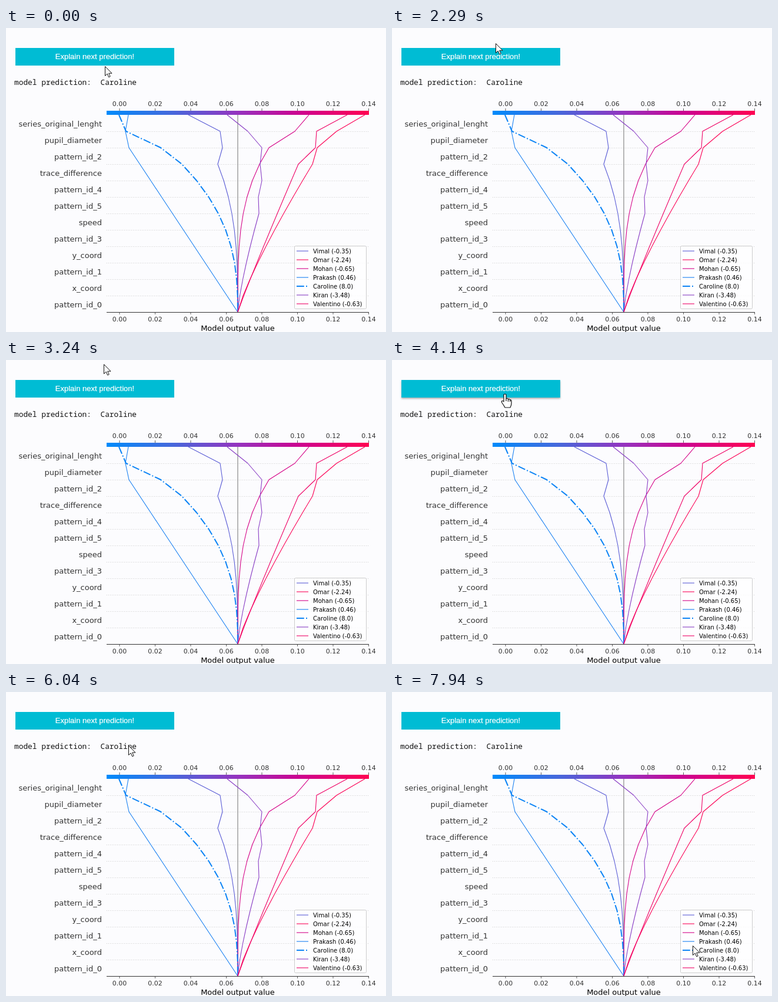
An HTML page that plays this animation: 646 px wide and 518 px high, repeating every 7990 ms.

```html
<!DOCTYPE html>
<html lang="en">
<head>
<meta charset="utf-8">
<title>Model explanation</title>
<style>
  html, body { margin: 0; width: 100%; height: 100%; overflow: hidden; background: #fcfcfe; }
  svg { display: block; width: 646px; height: 518px; }
  text { font-family: "DejaVu Sans", sans-serif; fill: #333; }
  .tick { font-size: 11px; text-anchor: middle; }
  .feature { font-size: 13px; text-anchor: end; }
  .legend { font-size: 10px; fill: #000; }
  .curve { fill: none; stroke-linejoin: round; }
  #button.hover { filter: drop-shadow(0 2px 1.5px rgba(0, 0, 0, .3)); }
</style>
</head>
<body>
<svg viewBox="0 0 646 518">
  <defs><linearGradient id="scale"></linearGradient></defs>
  <g id="button">
    <rect x="16" y="34" width="270" height="30" fill="#00bcd4"/>
    <text x="151" y="53" text-anchor="middle" style="font:13px 'Liberation Sans',sans-serif;fill:#fff;stroke:#fff;stroke-width:.2">Explain next prediction!</text>
  </g>
  <text x="14" y="97" style="font:12.85px 'Noto Sans Mono',monospace;white-space:pre;fill:#111">model prediction:  Caroline</text>
  <g id="chart"></g>
  <text x="394" y="516" style="font-size:13px;text-anchor:middle;fill:#000">Model output value</text>
  <g id="legend"></g>
  <g id="cursor" stroke="#111" fill="#fff" stroke-linejoin="round">
    <path id="arrow" d="M.5 .5V16.5L4.2 13L6.7 18.8L9.2 17.7L6.7 12.2H12Z"/>
    <path id="hand" stroke-width="1.2" d="M-2 13V2Q-2 0 0 0T2 2V8Q4.600 6.500 5.500 9Q8 8 8.700 10Q11 9.500 11 12V16Q11 19 9 23H0Q-2 19 -5 15Q-6.500 12 -4.500 11.500Q-3 11.500 -2 13ZM2 8V12M5.500 9V13M8.700 10V13"/>
  </g>
</svg>
<script>
const LOOP = 7990, TOP = 148, ROW = 28, LEFT = 171, RIGHT = 617, BASE = 394;
const $ = id => document.getElementById(id);

function add(parent, tag, attrs, text) {
  const node = document.createElementNS("http://www.w3.org/2000/svg", tag);
  for (const key in attrs) node.setAttribute(key, attrs[key]);
  if (text) node.textContent = text;
  return parent.appendChild(node);
}
function line(parent, x1, y1, x2, y2, stroke, attrs) {
  return add(parent, "line", { x1, y1, x2, y2, stroke, ...attrs });
}

const scaleColors = ["#008bfb", "#4668dc", "#9533bf", "#d0008c", "#ff0051"];
scaleColors.forEach((color, i) => add($("scale"), "stop", { offset: i / 4, "stop-color": color }));

function scaleColor(x) {
  const position = 4 * (x - LEFT) / (RIGHT - LEFT), i = Math.floor(position);
  return `color-mix(in srgb, ${scaleColors[i + 1]} ${100 * (position - i)}%, ${scaleColors[i]})`;
}

const features = ["series_original_lenght", "pupil_diameter", "pattern_id_2", "trace_difference",
  "pattern_id_4", "pattern_id_5", "speed", "pattern_id_3", "y_coord", "pattern_id_1", "x_coord", "pattern_id_0"];

// Each curve has a few leading positions, then decays to the base line with the given power.
const series = [
  { label: "Vimal (-0.35)", head: [310, 364, 368, 360], power: 3 },
  { label: "Omar (-2.24)", head: [610, 562, 529, 521], power: 1.2 },
  { label: "Mohan (-0.65)", head: [515, 491, 447], power: 3.4 },
  { label: "Prakash (0.46)", head: [208, 203, 209], power: 1 },
  { label: "Caroline (8.0)", head: [192, 204, 263, 299], power: 2.6, predicted: true },
  { label: "Kiran (-3.48)", head: [376, 411, 435, 432, 435, 429, 430], power: 1.3 },
  { label: "Valentino (-0.63)", head: [580, 528, 526, 497], power: 1.05 }
];

function curvePoints({ head, power }) {
  const rows = features.length, last = head.length - 1;
  return Array.from({ length: rows + 1 }, (_, i) => {
    const x = i < last ? head[i] : BASE + (head[last] - BASE) * ((rows - i) / (rows - last)) ** power;
    return `${x},${TOP + ROW * i}`;
  }).join(" ");
}

function lineStyle({ head, predicted }) {
  const color = `stroke:${scaleColor(head[0])};`;
  return { style: color + (predicted ? "stroke-width:2;stroke-dasharray:12.8 3.2 2 3.2" : "stroke-width:1.1") };
}

const chart = $("chart");
features.forEach((name, i) => {
  const y = TOP + ROW * i;
  if (i) line(chart, LEFT, y + .5, RIGHT, y + .5, "#ccc", { "stroke-dasharray": "1 2" });
  add(chart, "text", { class: "feature", x: 163, y: y + 20 }, name);
});
line(chart, BASE, TOP, BASE, 484, "#999", { "stroke-width": 1.4 });
for (const item of series) add(chart, "polyline", { class: "curve", points: curvePoints(item), ...lineStyle(item) });
add(chart, "rect", { x: LEFT, y: 141, width: RIGHT - LEFT, height: 7, fill: "url(#scale)" });
line(chart, LEFT, 484.5, RIGHT, 484.5, "#333");
for (let i = 0; i < 8; i++) {
  const x = 193 + 60.5 * i;
  for (const [tickY, labelY] of [[137, 133], [484, 500]]) {
    line(chart, x, tickY, x, tickY + 4, "#333", { "stroke-width": .8 });
    add(chart, "text", { class: "tick", x, y: labelY }, (i * .02).toFixed(2));
  }
}

const legend = $("legend");
add(legend, "rect", { x: 490.5, y: 371.5, width: 122, height: 107, rx: 2, fill: "#fff", "fill-opacity": .8, stroke: "#ccc" });
series.forEach((item, i) => {
  const y = 380 + 15 * i;
  line(legend, 494, y, 514, y, "", lineStyle(item));
  add(legend, "text", { class: "legend", x: 522, y: y + 4 }, item.label);
});

// Pointer moves: start time, end time, destination; the pointer rests in between.
const START = [168, 65];
const moves = [
  [820, 1270, 231, 45], [1730, 1810, 245, 36], [2200, 2280, 176, 26], [2340, 2700, 160, 52],
  [3020, 3220, 166, 7], [3670, 4450, 206, 85],
  [4490, 4740, 146, 84], [4740, 5000, 213, 80], [5000, 5210, 198, 77],
  [5310, 5500, 162, 88], [5500, 5720, 185, 108], [5720, 6090, 209, 90],
  [6260, 6850, 526, 400], [7210, 7930, 511, 432]
];

function pointerAt(t) {
  let [x, y] = START;
  for (const [from, to, toX, toY] of moves) {
    const u = Math.min(1, Math.max(0, (t - from) / (to - from))), ease = u * u * (3 - 2 * u);
    x += (toX - x) * ease;
    y += (toY - y) * ease;
  }
  return [Math.round(x), Math.round(y)];
}

function draw() {
  const [x, y] = pointerAt(performance.now() % LOOP);
  const hover = x >= 16 && x < 286 && y >= 34 && y < 64;
  $("cursor").setAttribute("transform", `translate(${x} ${y})`);
  $("arrow").style.display = hover ? "none" : "";
  $("hand").style.display = hover ? "" : "none";
  $("button").classList.toggle("hover", hover);
  requestAnimationFrame(draw);
}
draw();
</script>
</body>
</html>
```
